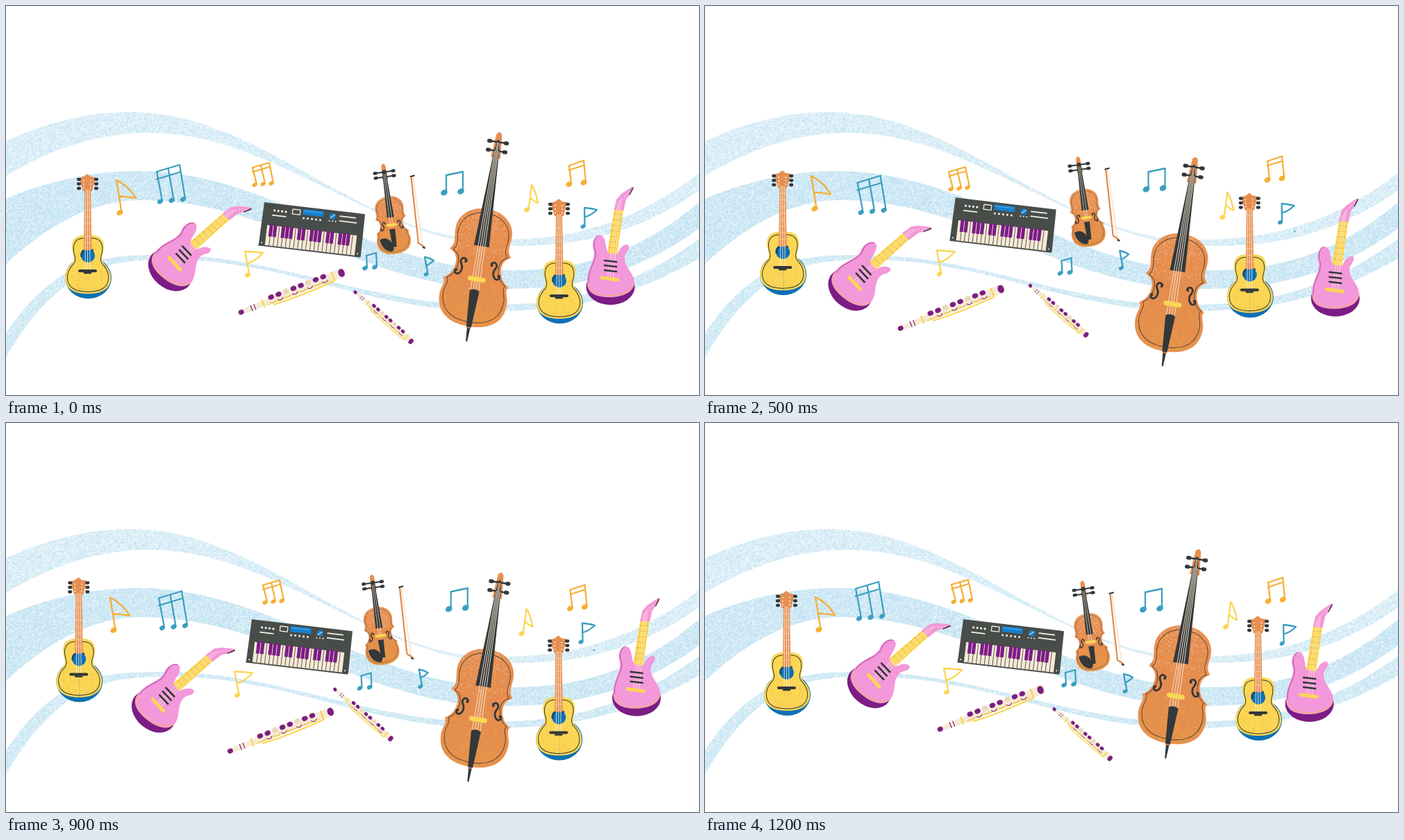
These frames come from a looping animation (998 by 561 pixels, 1.3 s). An HTML page with a canvas:

```html
<!DOCTYPE html>
<html lang="en">
<head>
<meta charset="utf-8">
<title>Floating instruments</title>
<style>
  html, body { margin: 0; width: 100%; height: 100%; overflow: hidden; background: #fff; }
  canvas, svg { position: absolute; left: 0; top: 0; width: 998px; height: 561px; display: block; }
</style>
</head>
<body>
<canvas id="waves" width="998" height="561"></canvas>
<svg id="stage" viewBox="0 0 998 561" stroke-linecap="round" stroke-linejoin="round"></svg>
<script>
const INK = '#33383a', ORANGE = '#e68f52', YELLOW = '#fbd655', PINK = '#f398da', PURPLE = '#7b1d84',
      BLUE = '#0e70b4', CREAM = '#f5ead6', TEAL = '#3a9fc0', AMBER = '#f6ae34', WHITE = '#f6f1e6';

let seed = 7;
const random = () => (seed = (seed * 16807) % 2147483647) / 2147483647;
const repeat = (n, make) => Array.from({ length: n }, (_, i) => make(i)).join('');

const fill = (d, color) => `<path d="${d}" fill="${color}"/>`;
const line = (d, color, width) => `<path d="${d}" fill="none" stroke="${color}" stroke-width="${width}"/>`;
const oval = (x, y, rx, ry, color) => `<ellipse cx="${x}" cy="${y}" rx="${rx}" ry="${ry}" fill="${color}"/>`;
const dot = (x, y, r, color) => oval(x, y, r, r, color);
const place = (transform, art) => `<g transform="${transform}">${art}</g>`;
const mirror = art => art + place('scale(-1 1)', art);

// Grain that thickens towards the top (-1) or the bottom (1) of a box centred on x = 0.
function grain(count, halfWidth, top, height, color, towards) {
  const d = repeat(count, () => {
    const v = random() ** 2;
    const y = top + height * (towards < 0 ? v : 1 - v);
    return `M${((random() * 2 - 1) * halfWidth).toFixed(1)} ${y.toFixed(1)}h.1`;
  });
  return line(d, color, 1.2);
}

// A wave edge: falls into a crest from the left, eases to a trough, then rises to the right.
const edge = (left, crestX, crestY, troughX, troughY, right) => (x, steep) => {
  if (x < crestX) return crestY + (left - crestY) * ((crestX - x) / crestX) ** steep;
  if (x > troughX) return troughY + (right - troughY) * ((x - troughX) / (998 - troughX)) ** 2.4;
  const u = (x - crestX) / (troughX - crestX);
  return crestY + (troughY - crestY) * (1 - Math.cos(Math.PI * u)) / 2;
};

function drawWaves() {
  const ctx = document.getElementById('waves').getContext('2d');
  const band = (color, steep, top, bottom) => {
    ctx.fillStyle = color;
    ctx.beginPath();
    for (let x = 0; x <= 998; x += 2) ctx.lineTo(x, top(x, steep));
    for (let x = 998; x >= 0; x -= 2) ctx.lineTo(x, bottom(x, steep));
    ctx.fill();
  };
  band('#dceff8', 2, edge(195, 180, 153, 700, 337, 241), edge(245, 205, 183, 725, 346, 266));
  band('#cde8f5', 2, edge(278, 190, 238, 720, 381, 283), edge(372, 195, 280, 710, 408, 321));
  band('#d3ebf6', 3, edge(472, 225, 359, 690, 431, 336), edge(507, 240, 366, 690, 440, 364));
  ctx.globalCompositeOperation = 'source-atop';
  for (const color of ['rgba(255,255,255,.7)', 'rgba(160,212,236,.4)']) {
    ctx.fillStyle = color;
    for (let i = 0; i < 50000; i++) ctx.fillRect(random() * 998, 150 + random() * 362, 1.3, 1.3);
  }
}

function acousticGuitar() {
  const half = 'M0 0C18 -2 24 6 23 19C22 28 18 31 22 39C30 47 33 53 33 61C33 77 20 84 0 84';
  return oval(.5, 61, 33.5, 30, BLUE) + mirror(fill(half, YELLOW)) + grain(110, 24, 45, 33, '#f0b646', 1) +
    place('translate(0 4) scale(.9 .92)', mirror(line(half, INK, 1.1))) +
    dot(0, 29, 10, BLUE) + line('M-9.500 30A10 10 0 0 1 7 21.500', '#17466b', 2.5) +
    fill('M-5 -65H4L5.500 21H-6Z', ORANGE) +
    fill('M-1 -89L4 -85L11 -84L6 -64H-7L-13 -83L-6 -85Z', ORANGE) +
    line(repeat(8, i => `M-5 ${-56 + i * 9.5}h9.500`), '#f6c199', .8) +
    line('M-3 -66L-4 51M-.5 -66V51M2 -66L3 51', '#fff0dc', .8) +
    line('M-12 51H11', INK, 4) + line('M-5 54H4', INK, 2.5) +
    repeat(3, i => line(`M-14 ${-81 + i * 6.5}h2M11 ${-81 + i * 6.5}h2`, INK, 4.3) +
      dot(-6, -79 + i * 5, 1, WHITE) + dot(4, -79 + i * 5, 1, WHITE));
}

// Drawn around the middle of the bridge.
function electricGuitar() {
  const body = 'M-1 -37C-7 -43 -3 -55 -11 -62C-19 -66 -25 -55 -24 -45C-17 -27 -33 -17 -32 7C-32 21 -19 27 -1 27' +
    'C21 27 36 19 36 5C35 -9 21 -17 22 -31C23 -39 31 -41 27 -49C19 -50 15 -43 11 -35Z';
  return oval(1.5, 12, 35, 26, PURPLE) + fill(body, PINK) +
    line('M-30 8C-28 20 -16 25 -1 25C18 25 30 20 34 8', '#f6b06a', 1.3) +
    line('M-16 -62C-24 -58 -23 -46 -20 -40C-18 -24 -32 -14 -30 6', '#b34ba4', 1) +
    fill('M7 -100L20 -99L11 -35L-3 -37Z', YELLOW) +
    fill('M6.500 -99L10 -114L17 -122L32 -132L35 -131L34 -127L24 -114L20.500 -98Z', PINK) +
    line(repeat(7, i => `M${6.5 - i * 1.3} ${-93 + i * 8}l11.500 1`), '#d9a53a', .8) +
    line('M12 -108L-3 0M14.500 -111L1 0M17 -114L5 0', '#fff1d0', .7) +
    line(repeat(3, i => `M-7 ${-26 + i * 7}l17 2`), INK, 2.7) +
    line('M-11 -1L12 2', YELLOW, 5) + line('M34 -131L29 -121', INK, 1.4) +
    repeat(5, i => dot(15 + i * 3.4, -112 - i * 3.3, .8, WHITE));
}

function stringBody(id) {
  const half = 'M0 -84C24 -84 40 -70 40 -50C40 -38 35 -30 43 -21C27 -16 28 12 46 22C41 28 48 36 48 46C48 70 32 85 0 85';
  const hole = line('M18 -8c5 -6 10 0 7 6c-3 5 -3 9 0 13c4 5 9 1 7 -3', INK, 2.8) + dot(19, -6, 2, INK) + dot(31, 8, 2, INK);
  return `<clipPath id="${id}"><path d="${half}"/><path d="${half}" transform="scale(-1 1)"/></clipPath>` +
    mirror(line(half, '#ec9459', 2.5) + fill(half, '#e58d4e')) +
    `<g clip-path="url(#${id})">` +
      grain(650, 38, -82, 65, '#f3b78e', -1) + grain(700, 48, 20, 65, '#e6ac3c', 1) + '</g>' +
    place('scale(.92 .94)', mirror(line(half, '#54402f', 1))) + mirror(hole);
}

const pegs = (x, y, gap, size) => repeat(2, i =>
  line(`M${-x} ${y + i * gap}H${x}`, INK, size * .45) + mirror(line(`M${x} ${y + i * gap}h-2`, INK, size)));

function cello() {
  return stringBody('cello-body') +
    fill('M-4 -194Q0 -201 4 -194L7 -160H-7Z', ORANGE) + pegs(13, -183, 13, 5.5) +
    fill('M-1.500 -186H1.500L4 -166L11 -31H-11L-4 -166Z', INK) +
    mirror(line('M.8 -182L2 36M2.500 -170L6 36', '#f7e3cd', .9)) +
    line('M-9 17H10', YELLOW, 7) +
    fill('M-7 34Q0 30 7 34L3.500 87H-3.500Z', INK) + fill('M-2.500 86H2.500L1 108H-1Z', INK) +
    line('M-2 88H2', '#d8772f', 2);
}

function violin() {
  return place('translate(0 24) scale(.5 .49)', stringBody('violin-body')) +
    fill('M-3 -62Q0 -68 3 -62L4 -42H-4Z', ORANGE) + pegs(14, -53, 7, 4.5) +
    fill('M-2.500 -56H2.500L5 13H-5Z', INK) +
    mirror(line('M1 -50L2 27', '#efdcc8', .7)) + line('M-5.500 24H6', YELLOW, 4) +
    fill('M-4 30H4L3 56H-3Z', INK) +
    fill('M-20 43Q-10 39 -4 48Q2 60 -5 62Q-18 60 -20 43Z', INK);
}

function bow() {
  return line('M586 247L600 345', '#fae9d9', 2.5) + line('M583.500 247L594 342L602 347', '#df8b4e', 2.2) +
    line('M582.500 246L588 244.500M600.500 348L603 349', INK, 2);
}

function keyboard() {
  const dots = (n, x, y, gap, r) => repeat(n, i => dot(x + i * gap, y, r, WHITE));
  return fill('M1 0H147L148 61Q148 63 146 63H0Q-1 62 0 60Z', '#484d4a') +
    fill('M9 32H139V61H9Z', CREAM) +
    line(repeat(21, i => `M${15 + i * 5.9} 33V61`), '#5b5650', 1) +
    repeat(21, i => i % 7 === 2 || i % 7 === 6 ? '' : fill(`M${12.5 + i * 5.9} 31h5v17h-5z`, PURPLE)) +
    dots(4, 17, 10, 5.5, 1.6) + dots(5, 60, 16, 6, 1.5) + dots(3, 97, 15.5, 4.5, 1) + dots(2, 4, 58, 139, 1) +
    line('M15 17H34M112 7H134M112 14H136', WHITE, 1.8) + line('M43 5H54V12H43Z', WHITE, 1.3) +
    fill('M58 3H88V11H58Z', '#1581d0') + line('M60 5.500H85', '#6db8ea', .8) +
    dot(101, 8.5, 4.5, '#1581d0') + line('M98 11L104 6', WHITE, 1);
}

function flute() {
  return line('M52 7Q95 10 146 7', YELLOW, 2) + fill('M0 -3.500L164 -6.500V6.500L0 3.500Z', CREAM) +
    line('M38 -5V5M146 -6V6', YELLOW, 2.5) + line('M20 -4V4M25 -4V4', PURPLE, 1.2) +
    line('M44 4H140', '#f2c94e', 1.4) + oval(4, 0, 4, 3.5, PURPLE) + oval(159, 0, 4.5, 6, PURPLE) +
    repeat(8, i => {
      const x = 52 + i * 11.5;
      return dot(x, -4, 5.2, CREAM) + oval(x, -4.5, 4.3, 3.5, i % 3 === 2 ? '#e9d8c0' : PURPLE) +
        line(`M${x - 4} 2Q${x} 7 ${x + 4} 2`, i % 2 ? PURPLE : '#eabf45', 1);
    });
}

const head = (x, y, size, color) => place(`translate(${x} ${y}) rotate(-30)`, oval(0, 0, size, size * .78, color));

function flagNote(color, x, y, lean, height, flagWidth, flagDrop) {
  const topX = x + lean, topY = y - height, midX = x + lean / 2 + 1, midY = y - height / 2;
  const tipX = topX + flagWidth, tipY = topY + flagDrop;
  return head(x, y, 2 + height * .06, color) +
    line(`M${x + 2.5} ${y - 1}L${topX} ${topY}Q${topX + flagWidth * .6} ${topY + flagDrop * .3} ${tipX} ${tipY}` +
      `Q${(tipX + midX) / 2} ${Math.max(tipY, midY) - 2} ${midX} ${midY}`, color, 2.3);
}

function beamNote(color, x, y, count, gap, rise, lean, height, bars) {
  const beam = drop => `M${x + lean} ${y - height + drop}l${gap * (count - 1)} ${-rise * (count - 1)}`;
  return repeat(count, i => {
    const headX = x + i * gap, headY = y - i * rise / 3;
    return head(headX, headY, 2.2 + gap * .12, color) +
      line(`M${headX + 3} ${headY - 1}L${headX + lean} ${y - height - i * rise}`, color, 2.2);
  }) + line(repeat(bars, i => beam(i * height / 4)), color, 2.3);
}

// Every part rests at home, drifts to pose a, then to pose b, and returns home.
const part = (art, a, b) => ({ art, poses: [[0, 0], a, b, [0, 0]] });
const parts = [
  part(flagNote(AMBER, 164, 298, -5, 47, 28, 26), [-4, -8], [-12, 1]),
  part(flagNote(YELLOW, 348, 388, -4, 34, 26, 2), [-7, -4], [-20, 6]),
  part(flagNote(TEAL, 605, 387, -2, 25, 13, 5) + dot(855, 334, 1.2, TEAL), [-4, -9], [-11, -9]),
  part(flagNote(YELLOW, 750, 294, 7, 36, 9, 26), [-3, 10], [-10, 13]),
  part(flagNote(TEAL, 831, 318, 2, 27, 18, 3), [-2, -7], [-4, -3]),
  part(beamNote(TEAL, 222, 282, 3, 16.5, 5, -5, 43, 2), [2, 15], [4, 18]),
  part(beamNote(AMBER, 358, 258, 3, 12, 3.5, -3, 25, 2), [-12, 8], [20, 1]),
  part(beamNote(TEAL, 517, 378, 2, 14, 4, 2, 18, 1), [-4, 8], [-10, 6]),
  part(beamNote(TEAL, 631, 269, 2, 24, 5, 3, 25, 1), [3, -6], [9, -1]),
  part(beamNote(AMBER, 811, 257, 2, 21, 7, 0, 27, 2), [-2, -13], [2, 14]),
  part(place('translate(118 331)', acousticGuitar()), [-2, 2], [-17, -26]),
  part(place('translate(243 371) rotate(40)', electricGuitar()), [-26, 22], [-32, 47]),
  part(place('translate(371 283) rotate(6.7)', keyboard()), [-7, -9], [-24, 0]),
  part(place('translate(335 443) rotate(-21.4)', flute()), [-69, 17], [-21, 42]),
  part(place('translate(501 411) rotate(41.5) scale(.69)', flute()), [-33, 0], [-39, -38]),
  part(bow() + place('translate(552 292) rotate(-8)', violin()), [-1, -10], [-22, -12]),
  part(place('translate(680 377) rotate(9)', cello()), [-7, 33], [3, 45]),
  part(place('translate(797 367)', acousticGuitar()), [-16, -24], [-1, 38]),
  part(place('translate(869 393)', electricGuitar()), [33, 26], [50, -11])
];

const LOOP = 1300, STEP = 100, STEPS_PER_LEG = 4;
const stage = document.getElementById('stage');
stage.innerHTML = parts.map(({ art }) => `<g>${art}</g>`).join('');
const groups = [...stage.children];
drawWaves();

function pose(time) {
  const progress = Math.floor((time % LOOP) / STEP) / STEPS_PER_LEG;
  const leg = Math.min(2, Math.floor(progress)), mix = progress - leg;
  parts.forEach(({ poses }, i) => {
    const [x, y] = poses[leg].map((from, axis) => from + (poses[leg + 1][axis] - from) * mix);
    groups[i].setAttribute('transform', `translate(${x} ${y})`);
  });
}

const start = performance.now();
function tick() {
  pose(performance.now() - start);
  requestAnimationFrame(tick);
}
tick();
</script>
</body>
</html>
```
